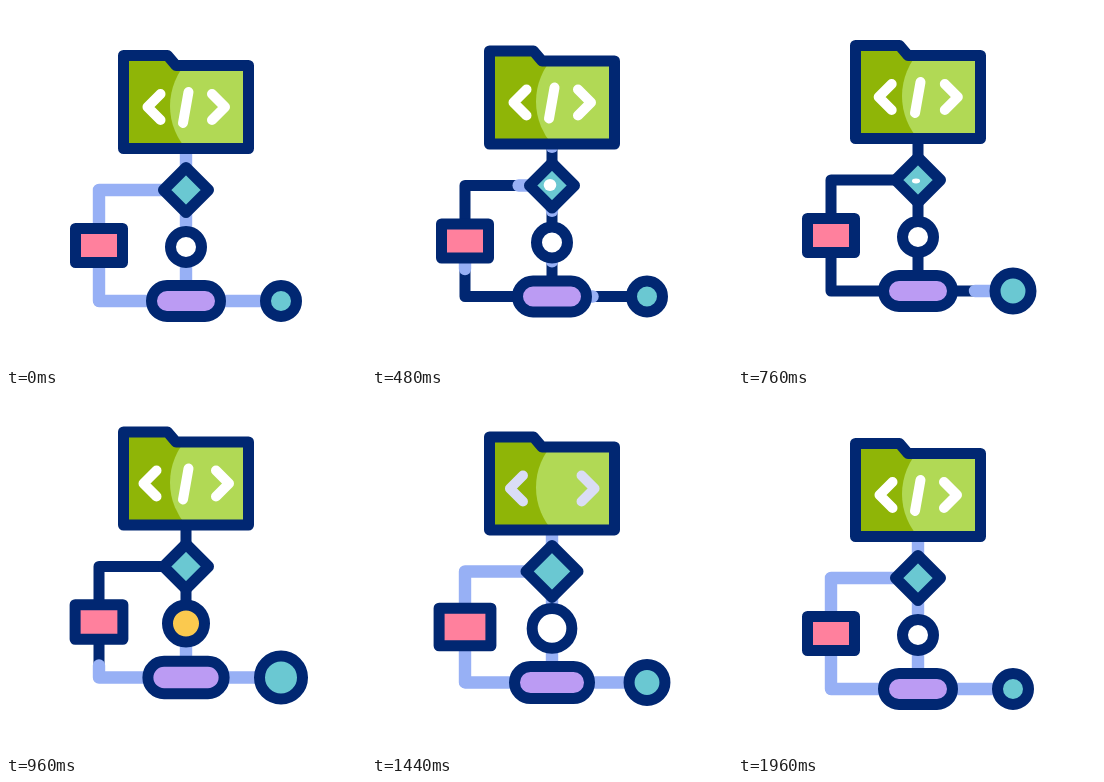
Animation of 360x360 px, one loop 2 s. Source, as an HTML page:

```html
<!DOCTYPE html>
<html lang="en">
<head>
<meta charset="utf-8">
<title>Code workflow</title>
<style>
  html, body { margin: 0; width: 100%; height: 100%; overflow: hidden; background: #fff; }
  svg { display: block; width: 100vw; height: 100vh; }
  .ink { stroke: #012772; stroke-width: 11; }
  .wire { fill: none; stroke: #012772; stroke-width: 11; }
  .flow { fill: none; stroke: #97b0f5; stroke-width: 12.4; }
  .code { fill: none; stroke: #fff; stroke-width: 10; }
</style>
</head>
<body>
<svg viewBox="0 0 360 360" stroke-linecap="round" stroke-linejoin="round">
  <defs>
    <path id="folder" d="M117.5 49.5H161.5L170 59.5H242.5V142.5H117.5Z"/>
    <clipPath id="inside"><use href="#folder"/></clipPath>
  </defs>
  <g id="scene">
    <g id="wires"></g>
    <use href="#folder" fill="#8fb507"/>
    <circle cx="229" cy="100" r="65" fill="#b1d955" clip-path="url(#inside)"/>
    <use href="#folder" class="ink" fill="none"/>
    <path id="left" class="code" d="M154.5 88L141.5 101L154.5 114"/>
    <path id="slash" class="code" d="M182.5 86L177 117"/>
    <path id="right" class="code" d="M206 88L219 101L206 114"/>
    <rect id="box" class="ink" fill="#ff809d"/>
    <circle id="ring" class="ink" cx="180" cy="241"/>
    <path id="diamond" class="ink" fill="#6ac8d2"/>
    <ellipse id="spot" cx="178" fill="#fff"/>
    <rect id="pill" class="ink" fill="#bb9bf3"/>
    <circle id="node" class="ink" cx="275" cy="295" fill="#6ac8d2"/>
  </g>
</svg>
<script>
const LOOP = 2000, STEP = 40;
const $ = id => document.getElementById(id);
const set = (el, attrs) => { for (const k in attrs) el.setAttribute(k, attrs[k]); };

const ease = (t, from, to) => {
  const x = Math.min(1, Math.max(0, (t - from) / (to - from)));
  return (1 - Math.cos(Math.PI * x)) / 2;
};
const pulse = (t, a, b, c, d) => ease(t, a, b) * (1 - ease(t, c, d));

// Each wire runs in the direction of flow; light refills it between from and to.
const wires = [
  { d: 'M259 295H215', from: 680, to: 840 },
  { d: 'M180 280V257', from: 820, to: 980 },
  { d: 'M146 295H93V256', from: 820, to: 1040 },
  { d: 'M93 223V184H160', from: 1000, to: 1340 },
  { d: 'M180 226V207', from: 1140, to: 1300 },
  { d: 'M180 162V143', from: 1260, to: 1420 }
];
for (const w of wires) {
  for (const name of ['wire', 'flow']) {
    const p = document.createElementNS('http://www.w3.org/2000/svg', 'path');
    set(p, { class: name, d: w.d });
    $('wires').append(p);
    w[name] = p;
  }
  w.len = w.flow.getTotalLength();
}

function drawFlow(w, t) {
  const refill = t >= 620;
  const start = refill ? 0 : ease(t, 80, 600);
  const end = refill ? ease(t, w.from, w.to) : 1;
  const size = (end - start) * w.len;
  set(w.flow, {
    'stroke-dasharray': `${size} ${w.len * 2}`,
    'stroke-dashoffset': -start * w.len,
    visibility: size > 0.1 ? 'visible' : 'hidden'
  });
}

function block(el, cx, cy, w, h, rx) {
  set(el, { x: cx - w, y: cy - h, width: 2 * w, height: 2 * h, rx });
}

function draw(t) {
  const lift = 11.5 * pulse(t, 120, 957, 1106, 1840);
  set($('scene'), { transform: `translate(0 ${-lift})` });
  wires.forEach(w => drawFlow(w, t));

  set($('node'), { r: 15.5 + 6 * pulse(t, 680, 860, 1160, 1660) });
  set($('ring'), {
    r: 15.5 + 6 * pulse(t, 860, 1060, 1320, 1660),
    fill: t >= 960 && t < 1360 ? '#fbc94e' : '#fff'
  });

  const p = pulse(t, 800, 1000, 1340, 1640);
  block($('pill'), 180, 295, 34.5 + 4 * p, 15.5 + 0.7 * p, 15.5 + 0.7 * p);
  const b = pulse(t, 920, 1120, 1240, 1700);
  block($('box'), 93, 239.5, 23.5 + 4 * b, 17 + 3 * b, 0);

  const h = 22.5 + 3.5 * pulse(t, 1060, 1240, 1440, 1800);
  set($('diamond'), { d: `M180 ${184 - h}L${180 + h} 184L180 ${184 + h}L${180 - h} 184Z` });
  const s = pulse(t, 320, 480, 560, 920);
  set($('spot'), { cy: 186 - 2.5 * s, rx: 6.3 * Math.sqrt(s), ry: 6 * s });

  const spread = 4 * pulse(t, 700, 900, 1340, 1800);
  const tint = pulse(t, 1240, 1660, 1700, 1880);
  const mix = (a, c) => Math.round(a + (c - a) * tint);
  const stroke = `rgb(${mix(255, 174)},${mix(255, 182)},${mix(255, 234)})`;
  $('left').style.stroke = $('right').style.stroke = stroke;
  set($('left'), { transform: `translate(${-spread} 0)` });
  set($('right'), { transform: `translate(${spread} 0)` });
  set($('slash'), { opacity: 1 - pulse(t, 1240, 1400, 1720, 1880) });
}

const begin = performance.now();
function tick() {
  const t = (performance.now() - begin) % LOOP;
  draw(Math.floor(t / STEP) * STEP);
  requestAnimationFrame(tick);
}
tick();
</script>
</body>
</html>
```
